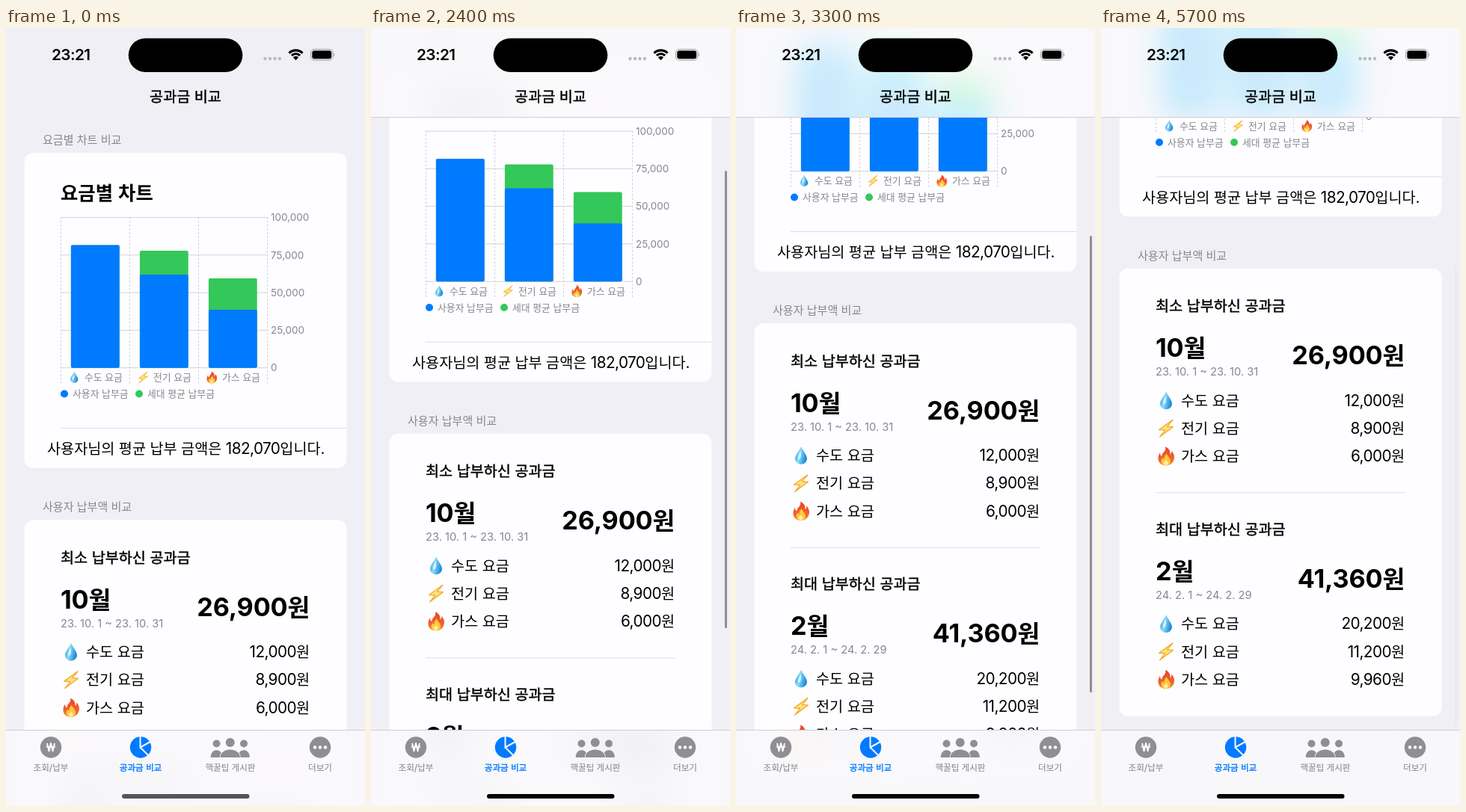
An HTML page that plays this animation: 480x1041 px, repeating every 5.8 s.

```html
<!DOCTYPE html>
<html lang="ko">
<head>
<meta charset="utf-8">
<title>공과금 비교</title>
<style>
html, body { margin: 0; width: 100%; height: 100%; overflow: hidden; background: #f0eff5; }
body > * { position: absolute; left: 0; top: 0; }
svg { overflow: visible; }
text { font-family: Inter, "Noto Sans CJK KR", "Noto Sans CJK", sans-serif; fill: #000; }
.big { letter-spacing: -.028em; }
.ko { font-family: "Noto Sans CJK KR", "Noto Sans CJK", sans-serif; font-size: .947em; letter-spacing: 0; }
.semi { stroke: #000; stroke-width: .42px; }
.bold { font-weight: 700; letter-spacing: -.004em; }
.time { font-weight: 600; }
.gray { fill: #87878c; }
.tab { fill: #8e8e93; stroke: #8e8e93; stroke-width: .15px; }
.on { fill: #007aff; stroke: #007aff; stroke-width: .35px; }
.end { text-anchor: end; }
.mid { text-anchor: middle; }
.glass { width: 480px; box-sizing: border-box; overflow: hidden; background: #f0eff5; }
.glass svg { position: absolute; left: 0; top: 0; filter: blur(26px) saturate(2.2); }
.glass::after { content: ""; position: absolute; inset: 0; background: rgba(250, 249, 252, .82); }
#head { height: 120px; border-bottom: 1px solid #cfced4; }
#foot { top: 939px; height: 102px; border-top: 1px solid #cfced4; }
#foot svg { top: -940px; }
#thumb { left: 472.5px; width: 3.5px; height: 611.5px; border-radius: 2px; background: #8f8e94; }
</style>
</head>
<body>
<svg id="page" width="480" height="1041">
  <defs>
    <linearGradient id="water" x1="0" x2="1" y2=".3">
      <stop stop-color="#1f93d2"/><stop offset=".45" stop-color="#8fdcfa"/><stop offset="1" stop-color="#1f8cd8"/>
    </linearGradient>
    <linearGradient id="flame" x2="0" y2="1">
      <stop stop-color="#e8402a"/><stop offset="1" stop-color="#f47a2c"/>
    </linearGradient>
    <g id="drop">
      <path fill="url(#water)" d="M0-12C2.5-6.5 8-.5 8 4.2A8 7.5 0 0 1-8 4.2C-8-.5-2.5-6.5 0-12"/>
      <path fill="#d9f5ff" d="M-.5-6C-3-1-4.5 2-3.5 5-1 6 1 0-.5-6"/>
    </g>
    <path id="bolt" fill="#fee27a" stroke="#f3a527" stroke-width="1.2" stroke-linejoin="round"
      d="M9-11.3L-9.3 2-1.3 2.6-8.5 11.5 9.5-1.8 1.6-2.5Z"/>
    <g id="fire">
      <path fill="url(#flame)" d="M-1-12.5C5-10 6-5 5.5-2 7-3 7.5-5 7.2-7 11-3 12 2 10 6 8 11 3 12.5 0 12.5-7 12.5-11 8-10.5 2-10.3-1-9-3-8-4.5-8-2-7 0-5.5 0-6-5 1-6-1-12.5"/>
      <path fill="#fdc93f" d="M1-3.5C1 0 6 2 6 7 6 11 3 12.5 0 12.5-4 12.5-7 10-6.5 6-6 4-5 3-4.5 2-4 4-3 4-2.5 4-3 1-1-1 1-3.5"/>
      <path fill="#fff0a0" d="M0 5C3 8 3 12 0 12.2-3 12-4 9-2.5 7-2 8-1 8 0 5"/>
    </g>
  </defs>
</svg>
<div id="head" class="glass"><svg width="480" height="1041"><use href="#list"/></svg></div>
<div id="foot" class="glass"><svg width="480" height="1041"><use href="#list"/></svg></div>
<svg id="bars" width="480" height="1041"></svg>
<div id="thumb"></div>
<script>
const $ = id => document.getElementById(id);
const icons = ['drop', 'bolt', 'fire'], fees = ['수도 요금', '전기 요금', '가스 요금'];

const text = (x, y, size, str, cls = '') =>
  `<text x="${x}" y="${y}" font-size="${size}" class="${size > 16 ? 'big ' : ''}${cls}">` +
  str.replace(/[가-힣][가-힣 ]*/g, '<tspan class="ko">$&</tspan>') + '</text>';
const rect = (x, y, w, h, r, fill, more = '') =>
  `<rect x="${x}" y="${y}" width="${w}" height="${h}" rx="${r}" fill="${fill}" ${more}/>`;
const circle = (x, y, r, fill) => `<circle cx="${x}" cy="${y}" r="${r}" fill="${fill}"/>`;
const path = (d, stroke, w, more = '') =>
  `<path d="${d}" fill="none" stroke="${stroke}" stroke-width="${w}" ${more}/>`;
const icon = (i, x, y, scale) =>
  `<use href="#${icons[i]}" transform="translate(${x} ${y}) scale(${scale})"/>`;

function chart() {
  let s = text(73, 229.6, 26.8, '요금별 차트', 'bold');
  for (let i = 0; i < 5; i++) {
    const y = 253.5 + i * 50.3;
    s += path(`M73 ${y}H350`, '#d3d2d8', 1) +
      text(354, y + 4.7, 13.5, (100000 - i * 25000).toLocaleString('en-US'), 'gray');
  }
  for (let i = 0; i < 4; i++)
    s += path(`M${73.5 + i * 92} 253V476`, '#cfced4', 1, 'stroke-dasharray="2.5 2.5"');
  [[290.5, 290.5], [298, 330], [335, 377]].forEach(([avg, own], i) => {
    const x = 86.9 + i * 92;
    s += rect(x, avg, 64.8, 454.7 - avg, 2, '#34c759') +
      rect(x, own, 64.8, 454.7 - own, 2, '#007aff') +
      icon(i, x + 4.3, 467.5, .64) + text(x + 18.1, 472.4, 13.6, fees[i], 'gray');
  });
  return s + circle(78, 489.5, 5, '#007aff') + text(89, 494.2, 13.6, '사용자 납부금', 'gray') +
    circle(178, 489.5, 5, '#34c759') + text(189, 494.2, 13.6, '세대 평균 납부금', 'gray');
}

function bill(dy, title, month, span, total, values) {
  return `<g transform="translate(0 ${dy})">` + text(73, 715.5, 20.76, title, 'semi') +
    text(73, 776.5, 34.2, month, 'bold') + text(73, 801.5, 14.66, span, 'gray') +
    text(406.3, 786.5, 34.2, total, 'bold end') +
    values.map((v, i) => icon(i, 87, 835 + i * 37.1, 1) +
      text(107, 842.3 + i * 37.1, 20.76, fees[i]) +
      text(406, 842.3 + i * 37.1, 20.76, v, 'end')).join('') + '</g>';
}

$('page').innerHTML += '<g id="list">' +
  text(49, 154.7, 15.9, '요금별 차트 비교', 'gray') + rect(24.5, 167, 431, 422, 12, '#fefdff') + chart() +
  path('M73 535.5H455.5', '#dddce1', 1) +
  text(55, 570, 20.76, '사용자님의 평균 납부 금액은 182,070입니다.') +
  text(49, 646.2, 15.9, '사용자 납부액 비교', 'gray') + rect(24.5, 658.3, 431, 599.2, 12, '#fefdff') +
  bill(0, '최소 납부하신 공과금', '10월', '23. 10. 1 ~ 23. 10. 31', '26,900원', ['12,000원', '8,900원', '6,000원']) +
  path('M73 958.3H406.5', '#dddce1', 1) +
  bill(298.7, '최대 납부하신 공과금', '2월', '24. 2. 1 ~ 24. 2. 29', '41,360원', ['20,200원', '11,200원', '9,960원']) +
  '</g>';

const wave = (r, w) => {
  const d = r * Math.SQRT1_2;
  return path(`M${387.5 - d} ${42.5 - d}A${r} ${r} 0 0 1 ${387.5 + d} ${42.5 - d}`, '#000', w);
};
const person = (x, y, r, w, h) => circle(x, y, r, '#8e8e93') +
  `<path fill="#8e8e93" d="M${x - w} 976C${x - w} ${976 - h} ${x + w} ${976 - h} ${x + w} 976Z"/>`;

$('bars').innerHTML =
  text(61, 43.4, 20.76, '23:21', 'time') + rect(163.7, 13.7, 152.6, 45.2, 22.6, '#000') +
  [346.5, 353, 359.5, 366].map(x => circle(x, 41, 2.2, '#bab9be')).join('') +
  wave(12.7, 3.2) + wave(7.9, 3) + '<path d="M387.5 43.3l-3.6-4a5.2 5.2 0 0 1 7.2 0z"/>' +
  rect(407.5, 28.5, 29.5, 14.5, 4.6, 'none', 'stroke="#9b9a9f"') + rect(409.3, 30.3, 25.9, 10.9, 3, '#000') +
  '<path d="M438.3 33.3q2 2.4 0 4.9z" fill="#9b9a9f"/>' +
  text(240, 99.4, 20.76, '공과금 비교', 'semi mid') +
  circle(60, 962.5, 14.2, '#8e8e93') +
  path('M55 957l2.5 10.5 2.5-10.5 2.5 10.5 2.5-10.5', '#fff', 1.9, 'stroke-linejoin="round"') +
  path('M53.5 961.8h13', '#fff', 1.2) +
  circle(180, 962.5, 14.2, '#007aff') + path('M179.5 947V962.5L194 954.5M179.5 962.5L191 974', '#f9f8fc', 2) +
  person(281.5, 957.5, 5, 7.8, 13) + person(318, 957.5, 5, 7.8, 13) +
  `<g stroke="#f9f8fc" stroke-width="1.6" paint-order="stroke">${person(299.7, 956, 6, 13.2, 14)}</g>` +
  circle(420, 962.5, 14.2, '#8e8e93') + [413, 420, 427].map(x => circle(x, 962.5, 2.2, '#fff')).join('') +
  ['조회/납부', '공과금 비교', '핵꿀팁 게시판', '더보기'].map((label, i) =>
    text(60 + i * 120, 994, 12.2, label, 'mid ' + (i == 1 ? 'on' : 'tab'))).join('') +
  rect(155, 1025, 170.5, 6, 3, '#000', 'id="home"');

// time, offset, speed
const keys = [[1600, 0, 0], [1700, 4, .08], [2400, 115.5, .19], [2900, 218, .155], [3300, 263, .1], [4200, 336.5, 0]];

function offset(t) {
  if (t <= 1600) return 0;
  if (t >= 4200) return 336.5;
  const i = keys.findIndex(k => k[0] > t);
  const [t0, a, va] = keys[i - 1], [t1, b, vb] = keys[i];
  const d = t1 - t0, u = (t - t0) / d, v = 1 - u;
  return v * v * (1 + 2 * u) * a + u * u * (3 - 2 * u) * b + u * v * d * (v * va - u * vb);
}

function draw(now) {
  const t = Math.floor(now % 5800 / 100) * 100;
  const y = offset(t), moved = t >= 1700;
  $('list').setAttribute('transform', `translate(0 ${-y})`);
  $('head').style.visibility = moved ? 'visible' : 'hidden';
  $('home').setAttribute('fill', moved ? '#000' : '#555459');
  $('thumb').style.top = 123.7 + y * .586 + 'px';
  $('thumb').style.opacity = moved ? Math.min(1, Math.max(0, (5720 - t) / 320)) : 0;
}

const start = performance.now();
let last = -1;
function tick() {
  const now = performance.now() - start, step = Math.floor(now / 100);
  if (step != last) draw(now);
  last = step;
  requestAnimationFrame(tick);
}
tick();
</script>
</body>
</html>
```
